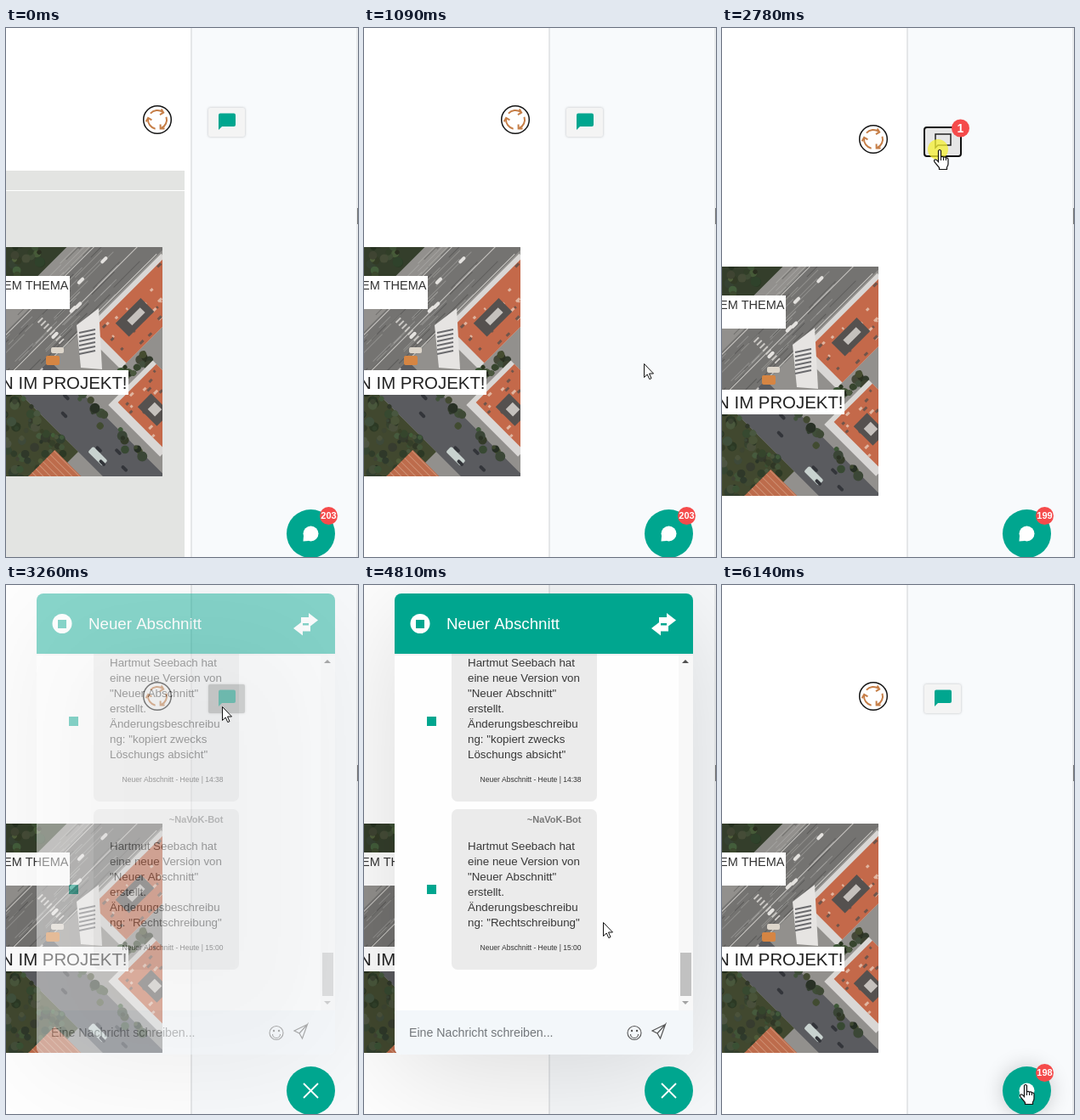
These frames come from a looping animation (414x623 px, 6.22 s). An HTML page with a canvas:

```html
<!DOCTYPE html>
<html lang="de">
<head>
<meta charset="utf-8">
<title>Chat</title>
<style>
html, body { margin: 0; width: 100%; height: 100%; overflow: hidden; background: #fff; }
canvas { display: block; }
</style>
</head>
<body>
<canvas id="stage" width="414" height="623"></canvas>
<script>
const LOOP = 6220, TICK = LOOP / 80;
const GREEN = '#00a68f', RED = '#f54b4b';
const SANS = '"Liberation Sans", Arial, sans-serif';
const main = document.getElementById('stage').getContext('2d');
let g = main;

function layer(w, h, draw) {
  const c = document.createElement('canvas');
  c.width = w;
  c.height = h;
  g = c.getContext('2d');
  draw();
  g = main;
  return c;
}
function rect(x, y, w, h, fill, radius = 0) {
  g.fillStyle = fill;
  g.beginPath();
  g.roundRect(x, y, w, h, radius);
  g.fill();
}
function disc(x, y, r, fill) {
  g.fillStyle = fill;
  g.beginPath();
  g.arc(x, y, r, 0, 7);
  g.fill();
}
function trace(points) {
  g.beginPath();
  for (let i = 0; i < points.length; i += 2) g.lineTo(points[i], points[i + 1]);
}
function poly(fill, ...points) {
  trace(points);
  g.fillStyle = fill;
  g.fill();
}
function line(color, width, ...points) {
  trace(points);
  g.strokeStyle = color;
  g.lineWidth = width;
  g.stroke();
}
function text(str, x, y, size, color, align = 'left', weight = '') {
  g.font = `${weight} ${size}px ${SANS}`;
  g.textAlign = align;
  g.fillStyle = color;
  g.fillText(str, x, y);
}
function shadow(color, blur, dy = 0) {
  g.shadowColor = color;
  g.shadowBlur = blur;
  g.shadowOffsetY = dy;
}
const noShadow = () => shadow('transparent', 0);
const smooth = p => { p = Math.min(1, Math.max(0, p)); return p * p * (3 - 2 * p); };

let seed = 7;
const rand = (min, max) => min + (max - min) * (seed = seed * 16807 % 2147483647) / 2147483647;

// fills a patch with small seeded marks
function scatter(count, u, v, w, h, mark) {
  for (let i = 0; i < count; i++) mark(rand(u, u + w), rand(v, v + h));
}
const tree = (u, v) => disc(u, v, rand(2, 6), `hsl(${rand(75, 110)} ${rand(12, 24)}% ${rand(15, 30)}%)`);
const grain = (u, v) => rect(u, v, rand(10, 45), 1, `rgba(${rand(0, 1) < .5 ? '40,40,40' : '210,208,204'},.3)`);

function house(u, v, w, h) {
  rect(u - 10, v - 6, w + 10, h + 6, '#d9d7d5');
  rect(u, v, w, h, '#c4694a');
  scatter(24, u, v, w - 6, h - 4, (x, y) => rect(x, y, rand(2, 6), 3, rand(0, 1) < .6 ? '#e0b5a0' : '#70554b'));
  rect(u + w * .2, v + h * .25, w * .35, h * .4, '#55514f');
  rect(u + w * .3, v + h * .38, w * .18, h * .15, '#c5c1bd');
}
function crossing(u, v) {
  for (let i = 0; i < 8; i++) rect(u, v + i * 5, 8, 2, '#cbc9c5');
}

// the town's streets run along the diagonals, so it is laid out on turned axes
const photo = layer(184, 270, () => {
  rect(0, 0, 184, 270, '#92908d');
  g.save();
  g.translate(92, 135);
  g.rotate(-Math.PI / 4);
  rect(-160, -200, 320, 90, '#343e2b');
  scatter(60, -60, -165, 120, 52, tree);
  rect(-160, -90, 320, 62, '#747371');
  scatter(90, -130, -104, 230, 76, grain);
  for (const v of [-88, -52, -30]) rect(-130, v, 280, 1, '#c9c7c3');
  house(34, -20, 120, 56);
  scatter(22, 22, 38, 36, 20, tree);
  house(-6, 62, 64, 80);
  rect(-80, -30, 52, 190, '#5a5b5f');
  crossing(-48, -30);
  crossing(-6, -72);
  rect(-200, -60, 120, 130, '#41482f');
  scatter(95, -155, -40, 75, 100, tree);
  scatter(24, -42, -20, 16, 150, tree);
  rect(-150, 49, 52, 80, '#bd6c4c');
  for (let u = -148; u < -98; u += 6) rect(u, 49, 1, 80, '#cf9275');
  rect(-72, 78, 9, 24, '#c8d2cf', 2);
  scatter(6, -76, 0, 40, 130, (u, v) => rect(u, v, 4, 9, '#33353a', 2));
  scatter(5, -20, -86, 130, 40, (u, v) => rect(u, v, 10, 4, '#e4e2df', 2));
  g.restore();

  poly('#e6e4e2', 83, 92, 109, 72, 113, 144, 88, 142);
  for (let y = 101; y < 131; y += 5) line('#6a6a6d', 2, 86, y, 105, y - 4);
  rect(47, 128, 16, 11, '#d58543', 2);
  rect(53, 118, 15, 7, '#dcd5ca', 2);

  rect(0, 34, 75, 39, '#fff');
  text('EM THEMA', 73.5, 50, 14.5, '#333', 'right');
  rect(0, 145, 144, 29, '#fff');
  text('N IM PROJEKT!', 142.5, 167, 20.4, '#222', 'right');
});

function bubble(y, h, lines, time) {
  rect(103, y, 171, h, '#ebebeb', 7);
  const last = y + h - 51;
  lines.forEach((s, i) => text(s, 122, last - (lines.length - 1 - i) * 18, 13.33, '#383838'));
  text(`Neuer Abschnitt - Heute | ${time}`, 255.5, y + h - 23, 8.5, '#333', 'right');
  rect(74, y + h - 100, 11, 11, GREEN);
}
const notice = ['Hartmut Seebach hat', 'eine neue Version von', '"Neuer Abschnitt"', 'erstellt.', 'Änderungsbeschreibu'];

function swapArrow(x, y, dir) {
  g.save();
  g.translate(x, y);
  g.scale(dir, 1);
  rect(-20, -3.5, 10, 7, '#fff');
  poly('#fff', -11, -8.5, 0, 0, -11, 8.5);
  g.restore();
}

const panel = layer(414, 623, () => {
  g.beginPath();
  g.roundRect(36, 10, 351, 543, 8);
  g.clip();
  rect(36, 10, 351, 543, '#fefefe');
  bubble(60, 195, [...notice, 'ng: "kopiert zwecks', 'Löschungs absicht"'], '14:38');
  bubble(264, 189, [...notice, 'ng: "Rechtschreibung"'], '15:00');
  text('~NaVoK-Bot', 255.5, 280, 11, '#777', 'right', 'bold');
  // header
  rect(36, 10, 351, 71, GREEN);
  rect(36, 81, 351, 2, 'rgba(0,0,0,.05)');
  disc(66, 45.5, 11.5, '#fff');
  rect(61, 41, 10, 10, GREEN);
  text('Neuer Abschnitt', 97, 52, 18.72, '#fff');
  swapArrow(367, 41.5, 1);
  swapArrow(338, 51, -1);
  // scrollbar
  rect(370, 83, 17, 418, '#f8f8f8');
  rect(372, 433, 13, 51, '#c1c1c1');
  poly('#505050', 374, 92, 378, 88, 382, 92);
  poly('#a3a3a3', 374, 490, 378, 494, 382, 490);
  // input row
  rect(36, 501, 351, 52, '#f3f7fa');
  text('Eine Nachricht schreiben...', 53, 532, 14.2, '#73777b');
  g.strokeStyle = '#555';
  g.lineWidth = 1.1;
  g.beginPath();
  g.arc(318, 527.5, 8, 0, 7);
  g.moveTo(322.5, 529);
  g.arc(318, 529, 4.5, 0, Math.PI);
  g.stroke();
  for (const x of [315, 321]) disc(x, 525, 1.2, '#555');
  line('#555', 1.2, 354.5, 517.5, 339, 525, 345, 528, 348.5, 534, 354.5, 517.5, 345, 528);
});

function cycleIcon(x, y) {
  disc(x, y, 16.5, '#fff');
  g.strokeStyle = '#151515';
  g.lineWidth = 1.5;
  g.beginPath();
  g.arc(x, y, 16.3, 0, 7);
  g.stroke();
  for (let i = 0; i < 3; i++) {
    g.save();
    g.translate(x, y);
    g.rotate(i * Math.PI * 2 / 3 - 2.4);
    g.strokeStyle = '#c67e47';
    g.lineWidth = 2;
    g.beginPath();
    g.arc(0, 0, 11, 0, 1.45);
    g.stroke();
    g.rotate(1.45);
    line('#c67e47', 2, 13, -3.5, 11, 1, 6.5, -1);
    g.restore();
  }
}

function badge(label, x, y, size) {
  disc(x, y, 10.5, RED);
  text(label, x, y + size * .36, size, '#fff', 'center', 'bold');
}

function chatTile(y, mode) {
  shadow('rgba(0,0,0,.25)', mode === 'hover' ? 0 : 3);
  rect(238, y, 43, 34, { plain: '#f4f4f4', hover: '#e6e6e6', focus: '#a9acac' }[mode], 2);
  noShadow();
  if (mode === 'hover') {
    g.strokeStyle = '#111';
    g.lineWidth = 2;
    g.beginPath();
    g.roundRect(238, y, 43, 34, 3);
    g.stroke();
    line('#222', 1.5, 251, y + 8, 269, y + 8, 269, y + 21, 254, y + 21, 251, y + 24, 251, y + 7.3);
    return;
  }
  const fill = mode === 'focus' ? '#00957f' : GREEN;
  rect(250, y + 6.5, 20, 15.5, fill, 2);
  poly(fill, 250, y + 10, 250, y + 26, 254, y + 22);
}

function launcher(open, hover, count) {
  shadow(`rgba(0,0,0,${hover ? .2 : 0})`, 24);
  disc(358.5, 595.5, 28.5, GREEN);
  noShadow();
  if (open) {
    line('#fff', 1.8, 350, 587, 367, 604);
    line('#fff', 1.8, 367, 587, 350, 604);
    return;
  }
  disc(358.5, 595.5, 9, '#fff');
  poly('#fff', 350, 598, 349.5, 604.5, 356, 604);
  badge(count, 379.5, 574.5, 11);
}

// cursor moves: start and end tick, where it ends, sideways bow of the path
const START = [360, 620];
const MOVES = [
  { from: 4, to: 7, x: 393, y: 603, bow: 0 },
  { from: 8, to: 14, x: 329, y: 395, bow: 30 },
  { from: 27, to: 33, x: 254, y: 143, bow: -35 },
  { from: 46, to: 55, x: 144, y: 385, bow: 0 },
  { from: 55, to: 64, x: 313, y: 427, bow: 33 },
  { from: 64, to: 70, x: 355, y: 588, bow: 0 }
];
function cursorAt(n) {
  let [x, y] = START;
  for (const m of MOVES) {
    if (n <= m.from) break;
    const p = Math.min(1, (n - m.from) / (m.to - m.from));
    const dx = m.x - x, dy = m.y - y;
    const side = m.bow * Math.sin(Math.PI * p) / Math.hypot(dx, dy);
    x += dx * p + dy * side;
    y += dy * p - dx * side;
  }
  return [x, y];
}
const arrowShape = new Path2D('M.5 .5V16.5L4.2 13L6.8 18.6L9 17.6L6.5 12H11.5Z');
const handShape = new Path2D('M.5 1.5Q2 -.5 3.5 1.5V9Q5.5 7.5 6.5 9.3Q8.5 8 9.4 10Q12 9.5 12 12V17Q12 19 10.5 21V23.5H1.5V21.5L-3.5 15.5Q-5.5 12.5 -3.5 12Q-2 11.5 .5 14.5Z');
function cursor(x, y, hand) {
  g.save();
  g.translate(Math.round(x), Math.round(y));
  const shape = hand ? handShape : arrowShape;
  g.fillStyle = '#fff';
  g.fill(shape);
  g.strokeStyle = '#111';
  g.lineWidth = hand ? 1.2 : 1;
  g.stroke(shape);
  if (hand) for (const fx of [3.5, 6.5, 9.4]) line('#111', 1, fx, 9.5, fx, 13);
  g.restore();
}

function page(n, tileMode) {
  const shift = n < 28 ? 0 : 23;
  rect(0, 0, 414, 623, '#fff');
  g.globalAlpha = Math.min(1, Math.max(0, 1 - (n - 8) / 6));
  rect(0, 168, 210, 455, '#e3e4e2');
  rect(0, 191, 210, 1, '#fff');
  g.globalAlpha = 1;
  rect(217, 0, 197, 623, '#f8fafc');
  rect(217, 0, 2, 623, '#e5e7e9');
  rect(412, 0, 2, 623, '#e8eaec');
  rect(413, 212, 1, 19, '#777');
  g.drawImage(photo, 0, 258 + shift);
  cycleIcon(178, 108 + shift);
  chatTile(94 + shift, tileMode);
  if (n >= 28 && n < 40) badge('1', 280.5, 118, 14);
}

function draw(n) {
  const [x, y] = cursorAt(n);
  const onLauncher = Math.hypot(x - 358.5, y - 595.5) < 28.5;
  const onTile = n >= 33 && n < 40;
  const open = n >= 40 && n < 75;
  page(n, onTile ? 'hover' : open ? 'focus' : 'plain');

  const alpha = n < 75 ? smooth((n - 40) / 4.2) : 1 - smooth((n - 74) / 5);
  if (alpha > 0) {
    g.globalAlpha = alpha;
    shadow('rgba(0,0,0,.15)', 140, 20);
    g.drawImage(panel, 0, 0);
    noShadow();
    g.globalAlpha = 1;
  }

  launcher(open, onLauncher && n > 60, n < 28 ? '203' : n < 75 ? '199' : '198');

  const clicking = (n >= 36 && n < 38) || (n >= 72 && n < 75);
  if (clicking) disc(x, y, 12, 'rgba(245,240,50,.75)');
  if (n >= 5) cursor(x, y, onLauncher || onTile);
}

// the picture advances in even ticks
function play(now) {
  draw(Math.min(79, Math.floor((now % LOOP + 30) / TICK)));
  requestAnimationFrame(play);
}
draw(0);
requestAnimationFrame(play);
</script>
</body>
</html>
```
